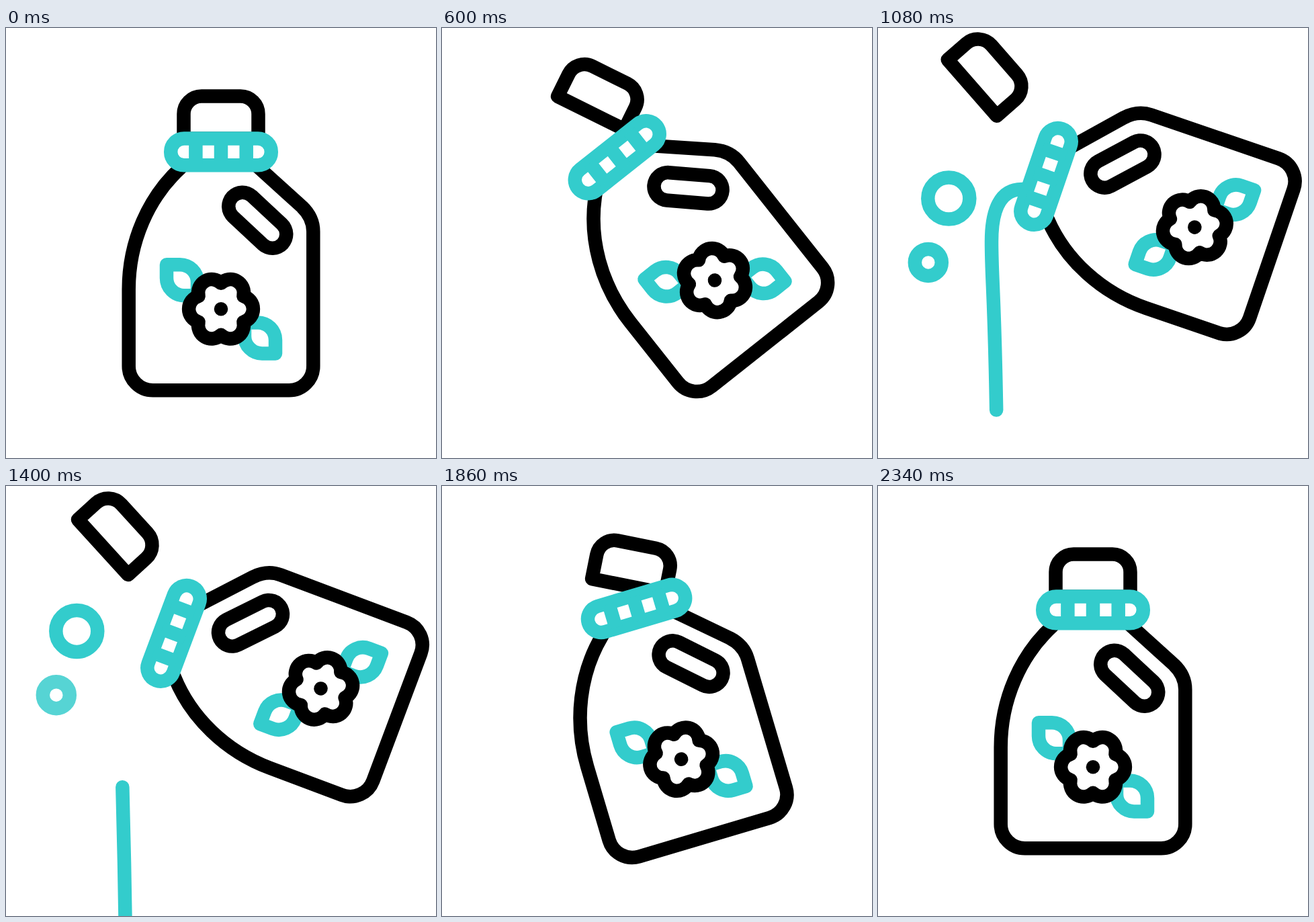
Recreate the animation shown at these times as an HTML page. Size 640 by 640 pixels, loop 2.4 s.

```html
<!DOCTYPE html>
<html lang="en">
<head>
<meta charset="utf-8">
<title>Pouring bottle</title>
<style>
  html, body { margin: 0; width: 100%; height: 100%; overflow: hidden; background: #fff; }
  svg { display: block; width: 100%; height: 100%; }
  .ink { fill: none; stroke: #000; }
  .teal { fill: none; stroke: #33cccc; }
  .ink, .teal { stroke-width: 20.5; stroke-linejoin: round; stroke-linecap: round; }
  .solid { fill: #fff; }
</style>
</head>
<body>
<svg viewBox="0 0 640 640">
  <path id="stream" class="teal" d="M219 240H214C176 240 169 283 169 318C169 372 173 390 176 559L178 672"/>
  <circle id="big" class="teal" cx="105.3" r="31"/>
  <circle id="small" class="teal" cx="74.8" r="20"/>
  <path id="cap" class="ink" d="M264.5 164.7V128a26.5 26.5 0 0 1 26.5-26.5h58a26.5 26.5 0 0 1 26.5 26.5V164.7Z"/>
  <g id="bottle">
    <path class="ink" d="M260 208C212 252 182.7 318 182.7 389V503.300a36 36 0 0 0 36 36H421.300a36 36 0 0 0 36-36V303C457.300 289 451 276 440.500 266L372 204"/>
    <path class="ink" d="M352 265.500L396.500 307" style="stroke-width:62"/>
    <path class="ink" d="M352 265.500L396.500 307" style="stroke:#fff;stroke-width:21"/>
    <g class="teal">
      <path id="leaf" d="M239 352.200H259A26 26 0 0 1 285 378.200V398.200H265A26 26 0 0 1 239 372.200Z"/>
      <use href="#leaf" transform="rotate(180 320 418.3)"/>
    </g>
    <path id="flower" class="ink solid"/>
    <circle cx="320" cy="418.3" r="10.3"/>
    <rect class="teal solid" x="245.2" y="164.500" width="149.6" height="39.8" rx="19.9"/>
    <path class="teal" style="stroke-linecap:butt" d="M282.400 166V203M320 166V203M357.700 166V203"/>
  </g>
</svg>
<script>
const LOOP = 2400, TURN = 1180, REST = 2340;
const $ = id => document.getElementById(id);
const stream = $('stream'), big = $('big'), small = $('small'), cap = $('cap'), bottle = $('bottle');
const streamLength = stream.getTotalLength();

const clamp = v => Math.min(1, Math.max(0, v));
const span = (t, from, to) => clamp((t - from) / (to - from));

// Strong ease in and out: cubic-bezier(.75, 0, .25, 1)
function ease(x) {
  let lo = 0, hi = 1;
  for (let i = 0; i < 24; i++) {
    const u = (lo + hi) / 2, v = 1 - u;
    if (2.25 * u * v * v + 0.75 * u * u * v + u * u * u < x) lo = u; else hi = u;
  }
  return lo * lo * (3 - 2 * lo);
}

function flowerPath() {
  let d = '';
  for (let k = 0; k < 6; k++) {
    const a = (30 + 60 * k) * Math.PI / 180;
    const x = 320 + 38.5 * Math.cos(a), y = 418.3 + 38.5 * Math.sin(a);
    d += (k ? 'A20 20 0 0 1 ' : 'M') + x.toFixed(2) + ' ' + y.toFixed(2);
  }
  return d + 'A20 20 0 0 1 ' + (320 + 38.5 * Math.cos(Math.PI / 6)).toFixed(2) + ' 437.55Z';
}

function pose(el, s, dx, dy, angle, cx, cy) {
  el.setAttribute('transform', `translate(${dx * s} ${dy * s}) rotate(${angle * s} ${cx} ${cy})`);
}

function bubble(el, t, y, start, end) {
  const alpha = Math.min(span(t, start, start + 300), 1 - span(t, end - 240, end));
  el.setAttribute('cy', y - 0.1177 * (t - 1080));
  el.setAttribute('opacity', alpha);
}

function pour(t) {
  const head = span(t, 740, 1180) * streamLength;
  const tail = span(t, 1180, 1610) * streamLength;
  const visible = head - tail > 0.5;
  stream.style.display = visible ? '' : 'none';
  if (visible) {
    stream.setAttribute('stroke-dasharray', `${head - tail} 2000`);
    stream.setAttribute('stroke-dashoffset', -tail);
  }
}

function draw(t) {
  const s = t < TURN ? ease(t / TURN) : 1 - ease(span(t, TURN, REST));
  pose(bottle, s, 7.24, -97.6, -71.45, 374.9, 305.2);
  pose(cap, s, -156.8, -65.2, 49.05, 320, 133.2);
  pour(t);
  bubble(big, t, 253.7, 780, 1740);
  bubble(small, t, 349, 780, 1600);
}

$('flower').setAttribute('d', flowerPath());
const begin = performance.now();
function tick() {
  draw((performance.now() - begin) % LOOP);
  requestAnimationFrame(tick);
}
tick();
</script>
</body>
</html>
```
